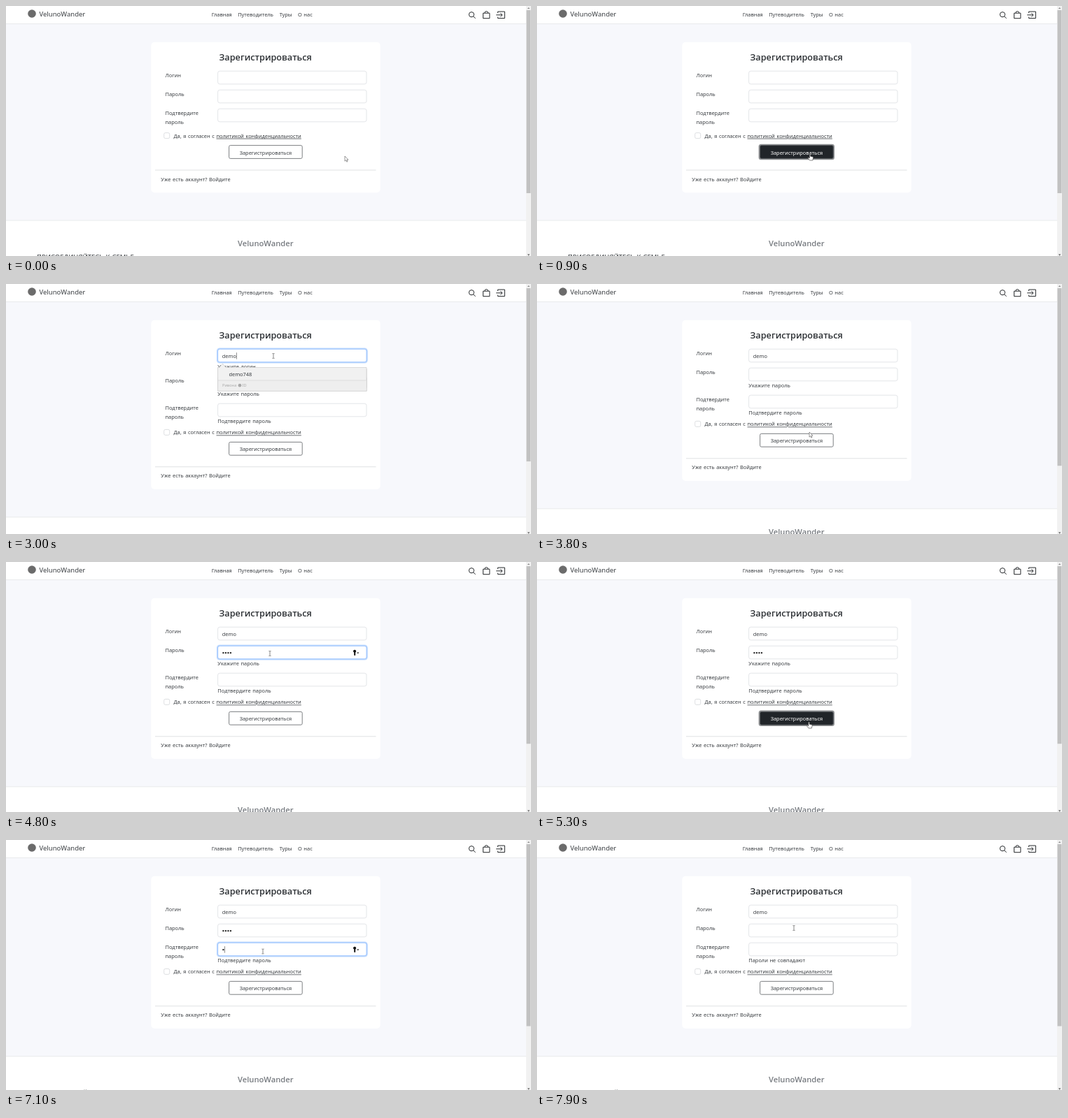
An HTML page for the animation above (8000 ms loop, 750 by 358 pixels).

```html
<!DOCTYPE html>
<html lang="ru">
<head>
<meta charset="utf-8">
<title>Регистрация</title>
<style>
html, body { margin: 0; width: 100%; height: 100%; overflow: hidden; background: #fff; }
svg { display: block; width: 100vw; height: 100vh; }
text { font: 7.4px "Noto Sans", "Open Sans", sans-serif; fill: #3a3e42; white-space: pre; word-spacing: .6px; }
.mid { text-anchor: middle; }
.brand { font-size: 9.5px; }
.title, .foot { font-family: "Open Sans", "Noto Sans", sans-serif; font-weight: 600; }
.title { font-size: 12.7px; fill: #2b2f33; }
.foot { font-size: 11.2px; fill: #777b80; }
.join { font-size: 9.5px; fill: #3a3e42; }
.small { font-size: 5.6px; fill: #aaa; }
.field { fill: #fff; stroke: #dcdfe3; stroke-width: .8; }
.halo { fill: #c2dbfe; }
.line { fill: none; stroke: #25282b; stroke-width: 1; }
.caret { stroke: #444; stroke-width: .6; }
</style>
</head>
<body>
<svg viewBox="0 0 750 358" preserveAspectRatio="none">
  <rect width="750" height="358" fill="#fff"/>
  <rect id="page" y="26" width="743" fill="#f7f8fc"/>
  <path d="M0 25.5H743" stroke="#e8eaec"/>

  <circle cx="37" cy="11" r="5.8" fill="#6b6b6b"/>
  <text class="brand" x="47.5" y="15.3">VelunoWander</text>
  <g class="mid">
    <text x="308.2" y="14.7">Главная</text>
    <text x="356.6" y="14.7">Путеводитель</text>
    <text x="399.6" y="14.7">Туры</text>
    <text x="427.4" y="14.7">О нас</text>
  </g>
  <g class="line">
    <circle cx="665" cy="12.2" r="3.6"/>
    <path d="M667.6 14.8L670.6 17.8"/>
    <path d="M681.6 10.2H690.9V17.7H681.6ZM684 10V9.2Q684 7.7 686.2 7.7T688.5 9.2V10"/>
    <path d="M702.6 10V8H712.4V17.6H702.6V15.6M700.2 12.8H709M706.4 10.2L709 12.8L706.4 15.4"/>
  </g>

  <rect id="card" x="207.3" y="51.8" width="327.4" rx="5" fill="#fff"/>
  <text class="title mid" x="370.7" y="77.8">Зарегистрироваться</text>

  <g id="row0"><text x="227.5" y="102.2">Логин</text></g>
  <g id="row1"><text x="227.5" y="129.4">Пароль</text></g>
  <g id="row2"><text x="227.5" y="156.4">Подтвердите</text><text x="227.5" y="168.6">пароль</text></g>

  <g id="rest">
    <rect x="225.7" y="181.6" width="8" height="8" rx="2" fill="#fff" stroke="#d3d6da" stroke-width=".8"/>
    <text x="239.5" y="188.7">Да, я согласен с</text>
    <text x="300.5" y="188.7" text-decoration="underline">политикой конфиденциальности</text>
    <rect id="ring" x="316.6" y="197.7" width="108.4" height="22.6" rx="3.5" fill="#909294"/>
    <rect id="btn" x="318.6" y="199.6" width="104.6" height="18.8" rx="2" stroke="#5c6064" stroke-width=".8"/>
    <text id="btnText" class="mid" x="370.9" y="212.6">Зарегистрироваться</text>
    <path d="M213 235H528.5" stroke="#dfe1e3"/>
    <text x="221.3" y="250.6">Уже есть аккаунт? Войдите</text>
    <path d="M0 307H743" stroke="#e8eaec"/>
    <text class="foot mid" x="370.8" y="344">VelunoWander</text>
    <text class="join" x="44" y="363.4">ПРИСОЕДИНЯЙТЕСЬ К СЕМЬЕ</text>
  </g>

  <g id="menu">
    <rect x="302" y="121" width="214" height="33" rx="1" fill="#000" opacity=".12"/>
    <path d="M302.5 119.5H305L309.5 114L314 119.5H515V153H302.5Z" fill="#f1f1f1" stroke="#cfcfcf" stroke-width=".7"/>
    <rect x="303" y="138" width="211.6" height="14.7" fill="#eeeeee"/>
    <path d="M303 138H514.6" stroke="#d4d4d4" stroke-width=".7"/>
    <text x="318.5" y="131.5">demo748</text>
    <text class="small" x="309" y="147.2">Ривона</text>
    <circle cx="334" cy="145.2" r="2.4" fill="#aaa"/>
    <text class="small" x="337.6" y="147.2">ID</text>
  </g>

  <rect x="743" width="7" height="358" fill="#f1f1f1"/>
  <rect id="thumb" x="743.5" y="6" width="6" fill="#c1c1c1"/>
  <path d="M744.9 4L746.6 2L748.3 4Z" fill="#8a8a8a"/>
  <path d="M744.9 355.4H748.3L746.6 357.4Z" fill="#505050"/>

  <g id="cursor">
    <path id="arrow" d="M0 0V7.2L1.7 5.7L2.8 8.2L4 7.7L2.9 5.2H5Z" fill="#fff" stroke="#555" stroke-width=".6"/>
    <path id="hand" d="M-.7 .4Q0 -.5 .7 .4V3.2L4.2 4.1Q4.8 4.5 4.6 5.6L3.8 9H-.4L-3 5.8Q-3 4.6 -1.9 5L-.7 5.9Z" fill="#fff" stroke="#333" stroke-width=".6"/>
    <path id="beam" d="M-1.6 -3.4H-.4L0 -3L.4 -3.4H1.6M0 -3V3M-1.6 3.4H-.4L0 3L.4 3.4H1.6" fill="none" stroke="#555" stroke-width=".7"/>
    <path id="press" d="M-2 0L.6 -2.8V2.8ZM.3 -3.2H1.3V3.2H.3Z" fill="#111"/>
  </g>
</svg>
<script>
const LOOP = 8000, STEP = 100;
const $ = id => document.getElementById(id);
const clamp = (v, lo, hi) => Math.min(hi, Math.max(lo, v));
const within = (t, a, b) => t >= a && t < b;
const show = (el, on) => el.setAttribute('visibility', on ? 'visible' : 'hidden');
const shift = (el, y) => el.setAttribute('transform', `translate(0 ${y})`);

function make(parent, tag, attrs) {
  const el = document.createElementNS('http://www.w3.org/2000/svg', tag);
  for (const k in attrs) el.setAttribute(k, attrs[k]);
  return parent.appendChild(el);
}

// One input with its focus halo, value, caret and hint
function makeField(i, hint) {
  const g = $('row' + i), y = 93.2 + 27 * i;
  const f = { g, y };
  f.halo = make(g, 'rect', { class: 'halo', x: 300.8, y: y - 1.8, width: 216, height: 22.2, rx: 4.3 });
  f.box = make(g, 'rect', { class: 'field', x: 302.6, y, width: 212.4, height: 18.6, rx: 2.8 });
  f.text = make(g, 'text', { x: 308.8, y: y + 12.4 });
  f.dots = Array.from({ length: 4 }, (_, k) =>
    make(g, 'circle', { cx: 310.4 + 3.5 * k, cy: y + 9.9, r: 1.2, fill: '#222' }));
  f.caret = make(g, 'path', { class: 'caret' });
  f.key = make(g, 'path', {
    d: `M496 ${y + 7.6}a2.1 2.1 0 1 1 3.2 1.8V${y + 13}l-1 1l-1 -1V${y + 9.4}A2.1 2.1 0 0 1 496 ${y + 7.6}` +
       `M501.2 ${y + 9.2}h3.2l-1.6 1.8Z`,
    fill: '#111'
  });
  f.hint = make(g, 'text', { x: 302.3, y: y + 28.1 });
  f.hint.textContent = hint;
  return f;
}

const fields = ['Укажите логин', 'Укажите пароль', 'Подтвердите пароль']
  .map((hint, i) => makeField(i, hint));

function drawField(f, s) {
  const caretX = s.dots ? 309 + 3.5 * s.dots : 308.8;
  show(f.halo, s.focus > 0);
  f.halo.setAttribute('opacity', s.focus);
  f.box.style.stroke = s.focus > 0 ? '#86b7fe' : '';
  f.text.textContent = s.text || '';
  f.dots.forEach((d, k) => show(d, k < (s.dots || 0)));
  const x = s.text ? 309.3 + f.text.getComputedTextLength() : caretX;
  f.caret.setAttribute('d', `M${x} ${f.y + 5}v9.4`);
  show(f.caret, s.caret);
  show(f.key, s.key);
  show(f.hint, s.hint);
}

// Pointer stops: time, x, y
const path = [
  [0, 484, 215], [400, 390, 212], [1400, 390, 212], [1800, 382, 103], [3000, 382, 103],
  [3100, 386, 236], [3700, 386, 234.5], [3800, 389, 212], [4000, 377, 131], [4900, 377, 131],
  [5000, 387, 224], [5200, 388.5, 229], [5900, 388.5, 229], [6000, 388, 201.5], [6200, 367, 129],
  [6400, 367, 129], [6500, 367, 159.5], [7300, 367, 159.5], [7400, 380, 212], [7700, 380, 212],
  [7900, 367, 126]
];

function pointer(t) {
  const i = path.findIndex(p => p[0] > t);
  if (i < 0) return path[path.length - 1].slice(1);
  const [a, x, y] = path[i - 1], [b, u, v] = path[i];
  const k = (t - a) / (b - a);
  return [x + (u - x) * k, y + (v - y) * k];
}

const focusAt = (t, a, b) => within(t, a, b) ? (t === a ? .6 : 1) : 0;
const typed = (t, start, n) => clamp(Math.floor((t - start) / 100) + 1, 0, n);

function render(t) {
  const hints = [within(t, 1100, 3300), within(t, 1100, 5500), t >= 1100];
  const down1 = hints[0] ? 12 : 0;
  const down2 = down1 + (hints[1] ? 12 : 0);
  const down = down2 + (hints[2] ? 2.8 : 0);
  shift($('row1'), down1);
  shift($('row2'), down2);
  shift($('rest'), down);
  $('card').setAttribute('height', 215.4 + down);
  $('page').setAttribute('height', 281 + down);
  $('thumb').setAttribute('height', 262 - .52 * down);

  const name = 'demo'.slice(0, typed(t, 2600, 4));
  const blink = t % 1000 < 500;
  const loginFocus = focusAt(t, 2200, 3100);
  const passFocus = focusAt(t, 4200, 5000) || focusAt(t, 6400, 6600);
  const confFocus = focusAt(t, 6600, 7500);
  const pass = t < 7600 ? typed(t, 4400, 4) : 0;
  drawField(fields[0], {
    text: name, focus: loginFocus, hint: hints[0],
    caret: loginFocus && (blink || name)
  });
  drawField(fields[1], {
    dots: pass, focus: passFocus, hint: hints[1],
    caret: within(t, 4200, 5000) && blink, key: passFocus && pass
  });
  fields[2].hint.textContent = t < 7600 ? 'Подтвердите пароль' : 'Пароли не совпадают';
  const conf = t < 7600 ? typed(t, 7100, 3) : 0;
  drawField(fields[2], {
    dots: conf, focus: confFocus, hint: hints[2],
    caret: confFocus && blink, key: confFocus && conf
  });
  show($('menu'), name && t < 3100);

  const [x, y] = pointer(t);
  const inX = x > 318 && x < 423;
  const hover = inX && y > 199.5 + down && y < 218.5 + down;
  const link = x > 300 && x < 422 && y > 182 + down && y < 191 + down && t < 1500;
  const ring = within(t, 700, 1100) || within(t, 3200, 3300) || within(t, 5200, 5500) || within(t, 7500, 7600);
  const dark = hover || ring;
  $('btn').setAttribute('fill', dark ? '#212529' : '#fff');
  $('btnText').style.fill = dark ? '#fff' : '';
  show($('ring'), ring);

  const tops = [93, 120 + down1, 147 + down2];
  const overField = x > 302 && x < 515 && tops.some(top => y >= top && y < top + 19);
  const press = t === 2100;
  const kind = press ? 'press' : hover || link ? 'hand' : overField ? 'beam' : 'arrow';
  for (const id of ['arrow', 'hand', 'beam', 'press']) show($(id), id === kind);
  $('cursor').setAttribute('transform', `translate(${x} ${y})`);
}

const start = performance.now();
function frame() {
  const t = (performance.now() - start) % LOOP;
  render(Math.floor(t / STEP) * STEP);
  requestAnimationFrame(frame);
}
frame();
</script>
</body>
</html>
```
